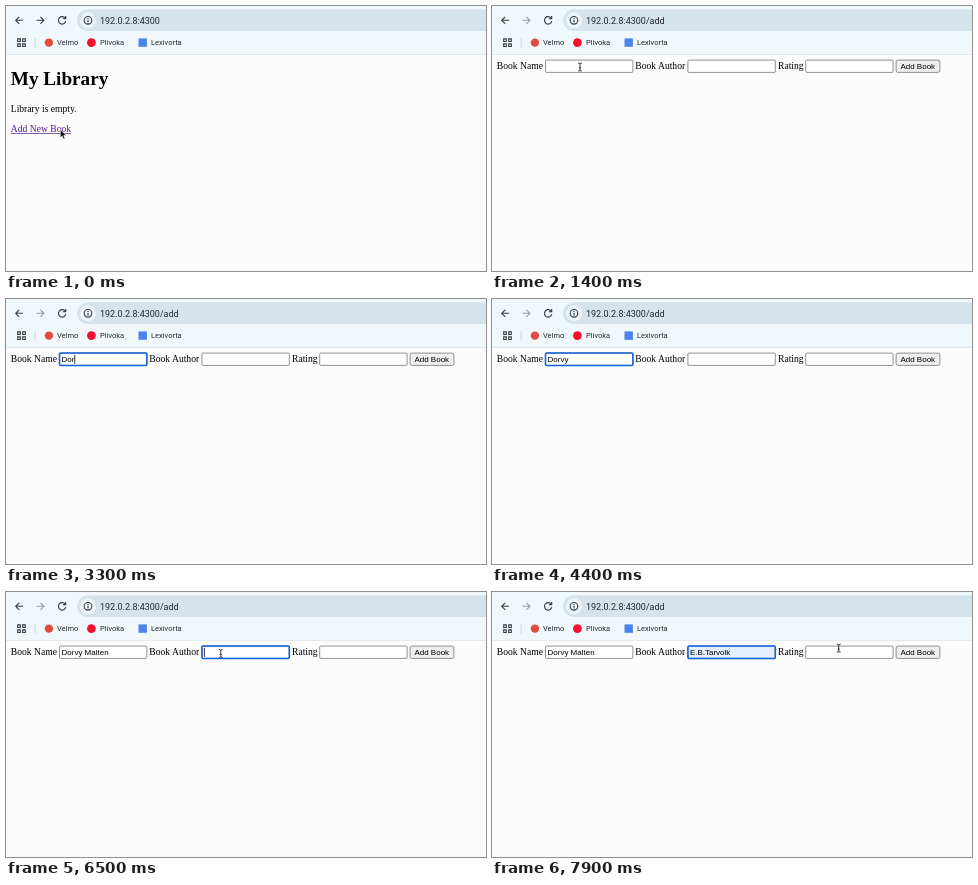
These frames come from a looping animation (480 by 265 pixels, 8 s). An HTML page:

```html
<!DOCTYPE html>
<html lang="en">
<head>
<meta charset="utf-8">
<title>Library</title>
<style>
html, body { margin: 0; width: 100%; height: 100%; overflow: hidden; background: #fcfcfc; }
svg { display: block; width: 480px; height: 265px; }
text { white-space: pre; }
.ui { font: 7.5px Roboto, sans-serif; fill: #24282b; }
.url { font-size: 9px; }
.page { font: 9.6px "Liberation Serif", serif; }
.h1 { font: bold 19.2px "Liberation Serif", serif; }
.field { font: 8px "Liberation Sans", sans-serif; }
.icon { fill: none; stroke: #353b3f; stroke-width: 1.1; }
.box { fill: #fff; stroke: #777; stroke-width: .8; }
</style>
</head>
<body>
<svg viewBox="0 0 480 265">
  <rect width="480" height="265" fill="#fcfcfc"/>

  <!-- browser bars -->
  <rect width="480" height="48" fill="#f0f8fb"/>
  <rect y="48" width="480" height=".8" fill="#dce6ea"/>
  <rect x="71" y="3.5" width="430" height="21.5" rx="10.75" fill="#d4e4ea"/>
  <circle cx="82" cy="14.3" r="8" fill="#edf5f8"/>
  <g class="icon">
    <path d="M17 14.3H9.8M13.2 10.8L9.7 14.3L13.2 17.8"/>
    <path id="forward" d="M30.5 14.3H37.8M34.4 10.8L37.9 14.3L34.4 17.8"/>
    <path d="M59.2 12.2A3.7 3.7 0 1 0 59.8 15.2M59.7 10V12.8H56.9"/>
    <circle cx="82" cy="14.3" r="3.8"/>
    <path d="M82 13.8V16.5M82 11.9V12.9"/>
    <path d="M11.7 32.9h2.6v2.6h-2.6zM16.7 32.9h2.6v2.6h-2.6zM11.7 37.9h2.6v2.6h-2.6zM16.7 37.9h2.6v2.6h-2.6z"/>
  </g>
  <rect x="28.7" y="32" width=".9" height="9.5" fill="#b9dce7"/>
  <circle cx="42.9" cy="36.6" r="4.2" fill="#e04a3f"/>
  <circle cx="85.4" cy="36.6" r="4.4" fill="#f5102f"/>
  <rect x="132.5" y="32.4" width="8.4" height="8.4" fill="#4a84ea"/>
  <g class="ui">
    <text id="url" class="url" x="94" y="17.5"></text>
    <text x="51" y="39.2">Velmo</text>
    <text x="94" y="39.2">Plivoka</text>
    <text x="145" y="39.2">Lexivorta</text>
  </g>

  <g id="home" class="page">
    <text class="h1" x="4.8" y="79">My Library</text>
    <text x="4.8" y="105.5">Library is empty.</text>
    <text x="4.8" y="126.3" fill="#551a8b">Add New Book</text>
    <rect x="4.8" y="127.3" width="60.2" height=".7" fill="#551a8b"/>
  </g>

  <g id="form" class="page">
    <text x="4.8" y="62.8">Book Name</text>
    <text x="143.3" y="62.8">Book Author</text>
    <text x="286" y="62.8">Rating</text>
    <rect class="box" x="53.5" y="54.1" width="87.4" height="12.3" rx="1"/>
    <rect id="authorBox" class="box" x="195.9" y="54.1" width="87.4" height="12.3" rx="1"/>
    <rect class="box" x="313.7" y="54.1" width="87.4" height="12.3" rx="1"/>
    <rect class="box" x="404.1" y="54.1" width="43.8" height="12.3" rx="1.8" style="fill:#efefef"/>
    <text class="field" x="408.4" y="62.9">Add Book</text>
    <rect id="ring" y="54" width="87.4" height="12.5" rx="1.4" fill="none" stroke="#1263dc" stroke-width="1.6"/>
    <text id="name" class="field" x="55.5" y="62.9"></text>
    <text id="author" class="field" x="197.9" y="62.9"></text>
    <rect id="caret" y="55.8" width=".8" height="9"/>
    <g id="badge">
      <rect x="46" y="67.5" width="19" height="15" rx="7.5" fill="#000" opacity=".06"/>
      <rect x="46.8" y="66.6" width="17.6" height="13" rx="6.5" fill="#0b6bfd"/>
      <text x="55.6" y="75.3" text-anchor="middle" fill="#fff" style="font:500 6px Inter, sans-serif">US</text>
    </g>
  </g>

  <path id="arrow" d="M0 0V8.3L1.9 6.6L3.3 9.6L4.7 9L3.4 6H5.9Z" stroke="#fff" stroke-width=".6"/>
  <path id="beam" d="M-1.9 -4Q0 -4 0 -3Q0 -4 1.9 -4M0 -3V3M-1.9 4Q0 4 0 3Q0 4 1.9 4M-1 .9H1" fill="none" stroke="#222" stroke-width=".9"/>
</svg>
<script>
const $ = id => document.getElementById(id);
const LOOP = 8000, OPEN = 300, FOCUS = 1600, HIDE = 1800, WAKE = 6200, TAB = 6400, FILL = 7400;
const TITLE = "Dorvy Malten", AUTHOR = "E.B.Tarvolk";
const keys = [2500, 2850, 3200, 3700, 3900, 4500, 4700, 4900, 5100, 5300, 5550, 5750];
// time, x, y
const path = [
  [0, 54.3, 123.5], [300, 56, 122], [700, 81, 89], [900, 84, 73], [1200, 88, 61],
  [6200, 88, 61], [6400, 214.8, 61.5], [6700, 214.8, 61.5], [7100, 219, 80],
  [7450, 219, 80], [7800, 346.7, 56.2], [8000, 346.7, 56.2]
];

const show = (id, on) => $(id).style.display = on ? "" : "none";
const put = (id, s) => { if ($(id).textContent !== s) $(id).textContent = s; };

function pointer(t) {
  const i = path.findIndex(p => p[0] > t), [t0, x0, y0] = path[i - 1], [t1, x1, y1] = path[i];
  const k = (t - t0) / (t1 - t0), e = k * k * (3 - 2 * k);
  return [x0 + (x1 - x0) * e, y0 + (y1 - y0) * e];
}

function draw(now) {
  const t = now % LOOP, onForm = t >= OPEN, focused = t >= FOCUS, second = t >= TAB;
  show("home", !onForm);
  show("form", onForm);
  put("url", "192.0.2.8:4300" + (onForm ? "/add" : ""));
  $("forward").style.stroke = onForm ? "#949da1" : "";

  put("name", TITLE.slice(0, keys.filter(k => k <= t).length));
  put("author", t >= FILL ? AUTHOR : "");
  $("authorBox").style.fill = t >= FILL ? "#e6effd" : "";

  show("ring", focused);
  $("ring").setAttribute("x", second ? 195.9 : 53.5);

  // the blink restarts at every edit
  const edit = Math.max(...[FOCUS, ...keys, TAB, FILL].filter(k => k <= t));
  show("caret", focused && (t - edit) % 1000 < 500);
  if (onForm) {
    const text = $(second ? "author" : "name");
    const width = text.textContent ? text.getComputedTextLength() : 0;
    $("caret").setAttribute("x", (second ? 197.9 : 55.5) + width);
  }
  $("badge").style.opacity = Math.max(0, Math.min(1, (t - 1650) / 100, (2600 - t) / 100));

  const [x, y] = pointer(t);
  const inField = onForm && y > 53 && y < 67;
  const visible = t < HIDE || t >= WAKE;
  show("arrow", visible && !inField);
  show("beam", visible && inField);
  for (const id of ["arrow", "beam"]) $(id).setAttribute("transform", `matrix(1 0 0 1 ${x} ${y})`);
}

let start;
function tick(now) {
  start ??= now;
  draw(now - start);
  requestAnimationFrame(tick);
}
draw(0);
requestAnimationFrame(tick);
</script>
</body>
</html>
```
